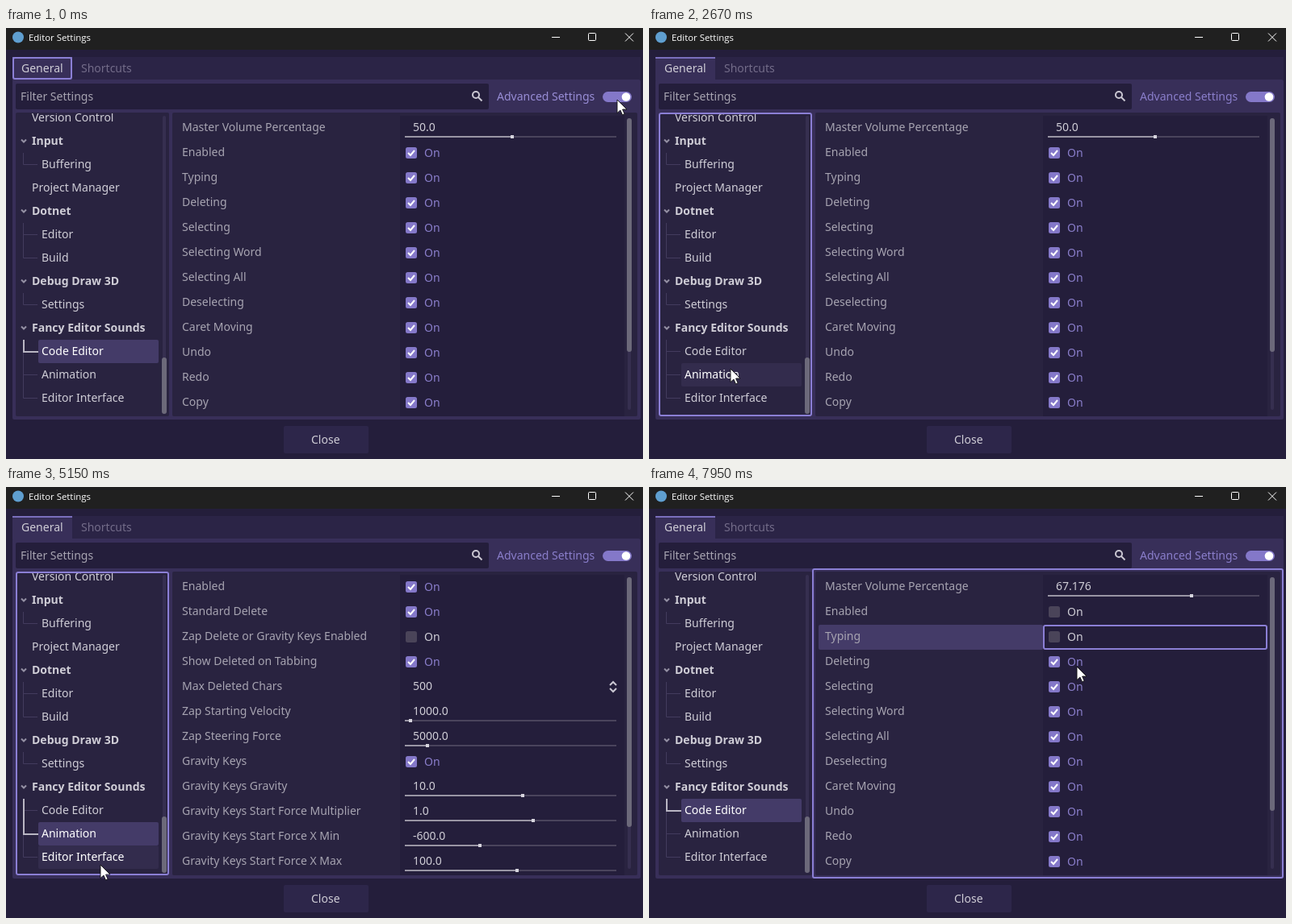
Animation of 789 by 535 pixels, one loop 8 s. Source, as an HTML page:

```html
<!DOCTYPE html>
<html lang="en">
<head>
<meta charset="utf-8">
<title>Editor Settings</title>
<style>
html, body { margin: 0; width: 100%; height: 100%; overflow: hidden; background: #241e3b; }
svg { display: block; width: 789px; height: 535px; }
text { font: 14px "Noto Sans", "Open Sans", sans-serif; fill: #cfcdd6; white-space: pre; }
.bold { font-weight: 700; }
.dim { fill: #a7a4b1; }
.faint { fill: #736c89; }
.accent { fill: #8a7ecb; }
.lit { fill: #988dd6; }
.white { fill: #fff; }
.title { font: 11.4px "Open Sans", "Noto Sans", sans-serif; fill: #fff; }
.line { fill: none; stroke: #433b5e; }
.branch { fill: none; stroke: #b9b6c3; stroke-width: 2; }
.mark { fill: none; stroke: #cac7d2; stroke-width: 2; }
.focus { fill: none; stroke: #8b7fd5; stroke-width: 2; }
.icon { fill: none; stroke: #9490a4; stroke-width: 2; }
.win { fill: none; stroke: #fff; }
</style>
</head>
<body>
<svg viewBox="0 0 789 535">
  <clipPath id="treeClip"><rect x="12" y="106" width="190" height="374"/></clipPath>
  <g id="ui"></g>
  <g id="pointer">
    <circle id="ring" r="12" fill="#beb41a" fill-opacity=".76"/>
    <path d="M0 0V16.6L3.9 13 6.5 18.8 9.1 17.7 6.6 12H12Z" fill="#fff" stroke="#111" stroke-width=".9"/>
  </g>
</svg>
<script>
const LOOP = 8000;
const ROW = 31, ITEM = 29;
const DARK = "#241e3b", PANE = "#292340", BODY = "#382f59", PICKED = "#443b68",
  HOVER = "#332c4d", ACCENT = "#8478c9", TRACK = "#362f50", THUMB = "#6c697a";

// pointer stops: arrive, leave, x, y
const STOPS = [
  [0, 1120, 758, 90], [1380, 1520, 104, 372], [1650, 1710, 188, 477], [1900, 2250, 104, 458],
  [2650, 2720, 102, 424], [2880, 3550, 104, 398], [3700, 3860, 100, 368], [4230, 4680, 105, 436],
  [4950, 5150, 118, 470], [5700, 5970, 124, 406], [6600, 6640, 633, 132], [6780, 6840, 624, 132],
  [7040, 7080, 678, 134], [7240, 7360, 504, 152], [7460, 7600, 506, 182], [7945, LOOP, 531, 224]
];

const DRAG = { from: 6640, to: 7060 };

// press, release, what it changes
const CLICKS = [
  [250, 360, { focus: "", advanced: false }],
  [660, 810, { advanced: true }],
  [1420, 1510, { focus: "tree", folded: true, pick: "" }],
  [2100, 2200, { folded: false }],
  [3080, 3140, { pick: "Code Editor" }],
  [4280, 4480, { pick: "Animation", page: "motion" }],
  [5760, 5910, { pick: "Code Editor", page: "code" }],
  [DRAG.from, DRAG.to, { focus: "panel", active: 0 }],
  [7260, 7350, { active: 1, enabled: false }],
  [7480, 7560, { active: 2, typing: false }]
];

const START = { focus: "tab", advanced: true, folded: false, pick: "Code Editor", page: "code",
  active: -1, enabled: true, typing: true };

// "#" marks a section, ">" an entry below it
const TREE = [">Output", ">Platforms", "Debugger", "Version Control", "#Input", ">Buffering",
  "Project Manager", "#Dotnet", ">Editor", ">Build", "#Debug Draw 3D", ">Settings",
  "#Fancy Editor Sounds", ">Code Editor", ">Animation", ">Editor Interface"];
const LAST = TREE.indexOf("#Fancy Editor Sounds");

const SOUNDS = ["Enabled", "Typing", "Deleting", "Selecting", "Selecting Word", "Selecting All",
  "Deselecting", "Caret Moving", "Undo", "Redo", "Copy"];

// label, value, slider range
const MOTION = [
  ["Enabled", true], ["Standard Delete", true], ["Zap Delete or Gravity Keys Enabled", false],
  ["Show Deleted on Tabbing", true], ["Max Deleted Chars", "500"],
  ["Zap Starting Velocity", "1000.0", 0, 50000], ["Zap Steering Force", "5000.0", 0, 50000],
  ["Gravity Keys", true], ["Gravity Keys Gravity", "10.0", -100, 100],
  ["Gravity Keys Start Force Multiplier", "1.0", -5, 5],
  ["Gravity Keys Start Force X Min", "-600.0", -2000, 2000],
  ["Gravity Keys Start Force X Max", "100.0", -2000, 2000]
];

const rect = (x, y, w, h, fill, r = 0) =>
  `<rect x="${x}" y="${y}" width="${w}" height="${h}" rx="${r}" fill="${fill}"/>`;
const disc = (x, y, r, fill) => `<circle cx="${x}" cy="${y}" r="${r}" fill="${fill}"/>`;
const frame = (x, y, w, h) => `<rect class="focus" x="${x}" y="${y}" width="${w}" height="${h}" rx="2"/>`;
const path = (d, cls) => `<path class="${cls}" d="${d}"/>`;
const text = (x, y, s, cls = "") => `<text class="${cls}" x="${x}" y="${y + 5}">${s}</text>`;

function pointerAt(t) {
  const i = STOPS.findIndex(s => s[1] > t);
  const [arrive, , x, y] = STOPS[i];
  if (t >= arrive) return [x, y];
  const [, leave, x0, y0] = STOPS[i - 1];
  const k = (t - leave) / (arrive - leave), e = k * k * (3 - 2 * k);
  return [Math.round(x0 + (x - x0) * e), Math.round(y0 + (y - y0) * e)];
}

function stateAt(t) {
  const s = Object.assign({}, START, ...CLICKS.filter(c => c[0] <= t).map(c => c[2]));
  const [x, y] = pointerAt(t);
  s.top = s.folded ? 111 : 24;
  s.count = s.folded ? LAST + 1 : s.advanced ? TREE.length : LAST;
  const item = Math.floor((y - s.top) / ITEM + .5);
  s.hover = x > 14 && x < 190 && y > 107 && item < s.count ? item : -1;
  s.overToggle = y < 101;
  s.drag = t >= DRAG.from && t < DRAG.to;
  s.steps = t < DRAG.from ? 131 : pointerAt(Math.min(t, DRAG.to))[0] - 502;
  return s;
}

function chrome(s) {
  const on = s.advanced;
  return rect(0, 0, 789, 535, DARK) + rect(0, 0, 789, 27, "#202020") +
    disc(15, 11.5, 7, "#5f9fd0") +
    `<text class="title" x="28" y="16">Editor Settings</text>` +
    path("M676 11.5H686M767 6.5l10 10M777 6.5l-10 10", "win") +
    `<rect class="win" x="721.5" y="6.5" width="9" height="9" rx="1"/>` +
    rect(8, 36, 778, 28, "#2b2446") + rect(8, 64, 778, 422, BODY, 2) +
    rect(8, 36, 74, 29, BODY) + rect(8, 36, 74, 2, "#7a6fbd") +
    text(19, 50, "General") + text(93, 50, "Shortcuts", "faint") +
    rect(12, 69, 586, 32, DARK, 2) + text(18, 85, "Filter Settings", "dim") +
    `<circle class="mark" cx="582" cy="83" r="4"/>` + path("M585 86l4.5 4.5", "mark") +
    text(608, 85, "Advanced Settings", on ? (s.overToggle ? "lit" : "accent") : "") +
    rect(739, 79, 36, 13, on ? ACCENT : "#57506c", 6.5) + disc(on ? 768 : 746, 85.5, 5.3, "#fff") +
    rect(344, 494, 105, 34, "#2d264a", 2) + text(378, 511, "Close") +
    (s.focus === "tab" ? frame(9, 37, 72, 26) : "");
}

function tree(s) {
  let out = "", branch = "", parent = s.top - ITEM;
  TREE.slice(0, s.count).forEach((entry, i) => {
    const y = s.top + i * ITEM;
    const child = entry[0] === ">", section = entry[0] === "#";
    const name = entry.replace(/^[#>]/, "");
    const picked = name === s.pick, bright = picked || i === s.hover;
    if (section) {
      parent = y;
      const closed = s.folded && i === LAST;
      out += path(closed ? `M20.5 ${y - 3}l3 3-3 3` : `M19 ${y - 1.5}l3 3 3-3`, "icon");
    }
    if (child) {
      out += path(`M21.5 ${parent + 15}V${y + .5}H39`, "line");
      if (picked) branch = path(`M22 ${parent + 15}V${y + 1}H40`, "branch");
      if (bright) out += rect(40, y - 14, 149, 29, picked ? PICKED : HOVER, 2);
    }
    out += text(child ? 44 : 32, y, name, (section ? "bold " : "") + (bright ? "white" : ""));
  });
  const bar = s.folded ? 407 : 409;
  return rect(12, 105, 190, 377, PANE, 2) + `<g clip-path="url(#treeClip)">${out}${branch}</g>` +
    rect(194, 109, 4, 370, TRACK, 2) + rect(193, bar, 6, 479 - bar, THUMB, 3) +
    (s.focus === "tree" ? frame(13, 106, 188, 375) : "");
}

function check(y, on) {
  return rect(495, y - 6, 14, 14, on ? ACCENT : "#4a4459", 2.5) +
    (on ? `<path d="M498 ${y + 1}l3 3 5-6" fill="none" stroke="#fff" stroke-width="2"/>` : "") +
    text(518, y + 1, "On", on ? "accent" : "");
}

function slider(y, part, drag) {
  const x = Math.floor(496 + 262 * part + .01);
  return rect(494, y + 11, 262, 2, "#4a445c") + rect(494, y + 11, x - 494, 2, "#9995a4") +
    (drag ? `<circle cx="${x}" cy="${y + 12}" r="5" fill="#5c5670" stroke="#fff" stroke-width="3"/>`
          : rect(x - 2, y + 10, 4, 4, "#d6d4dd"));
}

function rowsOf(s) {
  if (s.page === "motion") return MOTION;
  const volume = s.steps === 131 ? "50.0" : (s.steps / 2.62).toFixed(3);
  const states = [s.enabled, s.typing];
  return [["Master Volume Percentage", volume, 0, 100],
    ...SOUNDS.map((name, i) => [name, states[i] ?? true])];
}

function panel(s) {
  let out = rect(206, 105, 576, 377, PANE, 2);
  if (s.advanced) {
    out += rect(488, 109, 278, 373, DARK);
    rowsOf(s).forEach(([label, value, min, max], i) => {
      const y = 123 + i * ROW, active = i === s.active;
      if (active) out += rect(210, y - 14, 278, 31, PICKED, 2);
      out += text(218, y, label, "dim");
      if (typeof value === "boolean") out += check(y, value);
      else {
        out += text(504, y, value);
        out += max ? slider(y, (value - min) / (max - min), s.drag && active)
          : path(`M748 ${y - 1}l4-4 4 4M748 ${y + 3}l4 4 4-4`, "mark");
      }
      if (active) out += frame(489, y - 13, 276, 29);
    });
    out += rect(770, 112, 4, 362, TRACK, 2) + rect(769, 112, 6, s.page === "code" ? 290 : 310, THUMB, 3);
  }
  return out + (s.focus === "panel" ? frame(203, 102, 582, 383) : "");
}

const [ui, ring, pointer] = ["ui", "ring", "pointer"].map(id => document.getElementById(id));
const begin = performance.now();
let shown = "";

function draw() {
  const t = (performance.now() - begin) % LOOP;
  const s = stateAt(t), key = JSON.stringify(s);
  if (key !== shown) {
    ui.innerHTML = chrome(s) + tree(s) + panel(s);
    shown = key;
  }
  const [x, y] = pointerAt(t);
  pointer.setAttribute("transform", `translate(${x - 1} ${y - 1})`);
  ring.setAttribute("visibility", CLICKS.some(([a, b]) => t >= a && t < b) ? "visible" : "hidden");
  requestAnimationFrame(draw);
}
draw();
</script>
</body>
</html>
```
